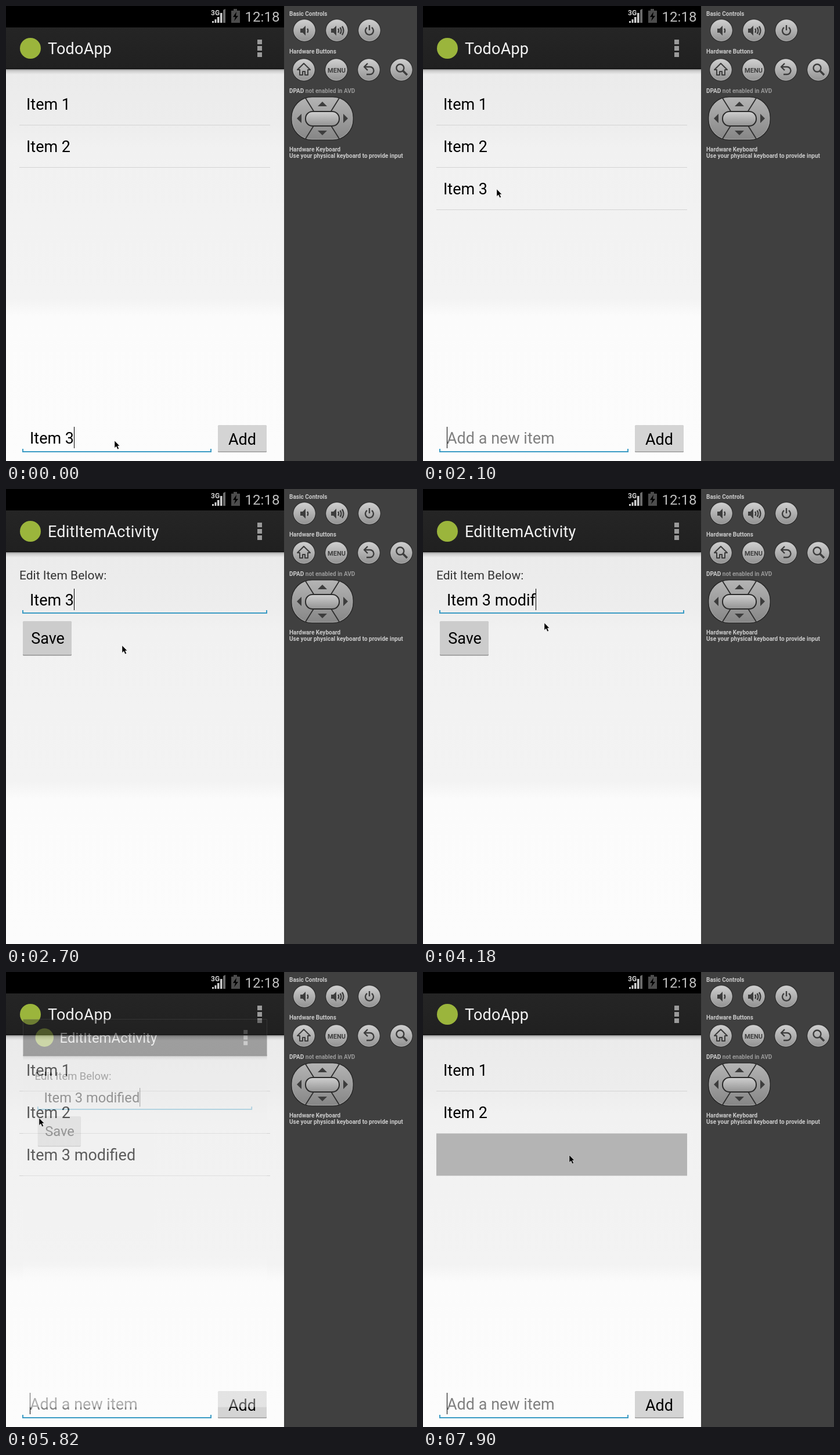
Animation of 708 by 785 pixels, one loop 8000 ms. Source, as an HTML page:

```html
<!DOCTYPE html>
<html lang="en">
<head>
<meta charset="utf-8">
<title>Todo list demo</title>
<style>
  html, body { margin: 0; width: 100%; height: 100%; overflow: hidden; background: #404040; }
  svg { display: block; width: 708px; height: 785px; }
  text { font: 27px Roboto, sans-serif; white-space: pre; }
  .title { fill: #f3f3f3; letter-spacing: .2px; }
  .mid { text-anchor: middle; }
  .line { fill: #d3d3d3; }
  .field { fill: none; stroke: #3a9bc4; stroke-width: 2; }
  .side text { font-size: 10px; font-weight: 700; fill: #cbcbcb; }
  .side .dim { fill: #999; }
  .glyph { fill: none; stroke: #3d3d3d; stroke-width: 2.4; stroke-linejoin: round; }
  .solid { fill: #3d3d3d; }
</style>
</head>
<body>
<svg viewBox="0 0 708 785">
  <defs>
    <linearGradient id="paper" gradientUnits="userSpaceOnUse" x1="0" y1="109" x2="0" y2="785">
      <stop offset="0" stop-color="#ebebeb"/>
      <stop offset=".14" stop-color="#ededed"/>
      <stop offset=".2" stop-color="#f1f1f1"/>
      <stop offset=".585" stop-color="#f3f3f3"/>
      <stop offset=".63" stop-color="#fbfbfb"/>
      <stop offset="1" stop-color="#fcfcfc"/>
    </linearGradient>
    <linearGradient id="shade" x2="0" y2="1">
      <stop offset="0" stop-color="#000" stop-opacity=".42"/>
      <stop offset=".3" stop-color="#000" stop-opacity=".14"/>
      <stop offset="1" stop-color="#000" stop-opacity="0"/>
    </linearGradient>
    <linearGradient id="bar" x2="0" y2="1">
      <stop offset="0" stop-color="#252525"/>
      <stop offset="1" stop-color="#202020"/>
    </linearGradient>
    <linearGradient id="metal" x2="0" y2="1">
      <stop offset="0" stop-color="#d0d0d0"/>
      <stop offset="1" stop-color="#929292"/>
    </linearGradient>
    <linearGradient id="pad" x2="0" y2="1">
      <stop offset="0" stop-color="#b4b4b4"/>
      <stop offset="1" stop-color="#868686"/>
    </linearGradient>
    <g id="screen">
      <rect y="37" width="479" height="763" fill="url(#paper)"/>
      <rect y="37" width="479" height="72" fill="url(#bar)"/>
      <rect y="107" width="479" height="2" fill="#161616"/>
      <rect y="109" width="479" height="9" fill="url(#shade)"/>
      <circle cx="42" cy="73" r="18" fill="#9bb53c"/>
      <path d="M433 58h8v8h-8zm0 11h8v8h-8zm0 11h8v8h-8z" fill="#9a9a9a"/>
    </g>
    <g id="knob">
      <circle r="20" fill="#303030"/>
      <circle r="18.3" fill="url(#metal)" stroke="#c6c6c6" stroke-width=".8"/>
    </g>
  </defs>

  <g id="todo">
    <use href="#screen"/>
    <text class="title" x="72" y="83">TodoApp</text>
    <text x="35" y="179">Item 1</text>
    <rect class="line" x="23" y="205" width="432" height="1"/>
    <text x="35" y="252">Item 2</text>
    <rect class="line" x="23" y="278" width="432" height="1"/>
    <g id="row">
      <rect class="line" x="23" y="351" width="432" height="1"/>
      <rect id="press" x="23" y="279" width="432" height="72"/>
      <text id="item" x="35" y="325"></text>
    </g>
    <path class="field" d="M29 764v5h324v-5"/>
    <text id="entry" x="41" y="755"></text>
    <rect id="entryCaret" y="726" width="1" height="37"/>
    <rect x="365" y="724" width="84" height="46" rx="1.5" fill="#9c9c9c"/>
    <rect x="365" y="723" width="84" height="45.5" rx="1.5" fill="#d4d4d4"/>
    <text class="mid" x="407" y="757">Add</text>
  </g>

  <g id="edit">
    <use href="#screen"/>
    <text class="title" x="72" y="83">EditItemActivity</text>
    <text x="23" y="156" style="font-size:21px" fill="#333">Edit Item Below:</text>
    <path class="field" d="M29 209v5h420v-5"/>
    <text id="draft" x="41" y="201"></text>
    <rect id="draftCaret" y="172" width="1" height="37"/>
    <rect x="29" y="229" width="84" height="58.5" rx="1.5" fill="#8f8f8f"/>
    <rect x="29" y="228" width="84" height="58" rx="1.5" fill="#ccc"/>
    <text class="mid" x="72" y="267">Save</text>
  </g>

  <rect width="479" height="37"/>
  <text x="353" y="16" fill="#d0d0d0" style="font-size:12px;font-weight:700">3G</text>
  <path d="M355 29v-3h3v3zm4.500 0v-6h3v6zm4.500 0v-10h3.500v10zm5 0v-17h3.500v17z" fill="#cfcfcf"/>
  <path d="M374 29v-22l4 -2v24z" fill="#6b6b6b"/>
  <path d="M388 8h4v-3h6v3h5v21h-15z" fill="#4c4c4c"/>
  <path d="M397 10l-6 9h4l-2 7 7-9h-4z"/>
  <text class="mid" x="441.500" y="27" fill="#bebebe" style="font-size:24px">12:18</text>

  <g class="side">
    <rect x="479" width="229" height="785" fill="#404040"/>
    <text x="488" y="17">Basic Controls</text>
    <text x="488" y="82">Hardware Buttons</text>
    <text x="488" y="150">DPAD <tspan class="dim">not enabled in AVD</tspan></text>
    <text x="488" y="251">Hardware Keyboard</text>
    <text x="488" y="262">Use your physical keyboard to provide input</text>

    <g id="knobs"></g>
    <path class="solid" d="M507 39h4l5-5v17l-5-5h-4zM560 39h4l5-5v17l-5-5h-4z"/>
    <path class="glyph" stroke-width="2" d="M519 39q2.500 3.500 0 7M572 39q2.500 3.500 0 7m3.500-9q4 5.500 0 11m3.500-13q5 7.500 0 15"/>
    <path class="glyph" d="M622 37a7 7 0 1 0 8 0M626 33v9"/>
    <path class="glyph" style="stroke-width:2" d="M502 110l11-11 11 11h-4v9h-5v-6h-4v6h-5v-9z"/>
    <text class="mid" x="569.500" y="115" style="font-size:11px;fill:#3d3d3d">MENU</text>
    <path class="glyph" d="M618 105h9a6 6 0 0 1 0 13h-6M623 99l-6 6 6 6"/>
    <circle class="glyph" cx="679" cy="107" r="6.500"/>
    <path class="glyph" style="stroke-width:3.500" d="M684 112l7 7"/>

    <rect x="491" y="156" width="108" height="76" rx="36" fill="#2a2a2a"/>
    <rect x="493" y="158" width="104" height="72" rx="34" fill="url(#pad)" stroke="#bdbdbd" stroke-width=".8"/>
    <path d="M516 159l15 24M574 159l-15 24M516 229l15-24M574 229l-15-24" stroke="#2e2e2e" stroke-width="1.800"/>
    <rect x="516" y="182" width="58" height="25" rx="12" fill="url(#metal)" stroke="#2b2b2b" stroke-width="2"/>
    <path class="solid" d="M537 173l8-8 8 8zM537 215h16l-8 8zM509 186v16l-8-8zM581 186v16l8-8z"/>
  </g>

  <path id="pointer" d="M0 0V12.500L3 9.800L5.200 14.800L7.500 13.800L5.300 9H8.800Z" stroke="#fff" stroke-width=".6" stroke-opacity=".8"/>
</svg>
<script>
const LOOP = 8000, STEP = 149.05;
const $ = id => document.getElementById(id);
const show = (el, on) => el.setAttribute('visibility', on ? 'inherit' : 'hidden');
const within = (n, a, b) => n >= a && n <= b;

// Pointer stops: step, x, y
const path = [
  [0, 187, 750], [4, 374, 748], [6, 377, 746], [7, 377, 742],
  [9, 355, 620], [11, 298, 470], [12, 240, 388], [13, 150, 326],
  [14, 127, 316], [16, 127, 316], [18, 200, 270], [19, 209, 231],
  [33, 209, 231], [34, 204, 231], [35, 204, 231], [36, 110, 240],
  [37, 36, 246], [38, 36, 246], [39, 57, 252], [41, 100, 265],
  [44, 225, 322], [46, 252, 316], [54, 252, 316]
];

// Steps in which each caret is blinked off
const entryOff = [[1, 3], [9, 11], [43, 45], [49, 51]];
const draftOff = [[22, 23], [30, 32], [36, 36]];

$('knobs').innerHTML = [[514, 42], [570, 42], [626, 42], [513, 110], [569, 110], [625, 110], [681, 110]]
  .map(([x, y]) => `<use href="#knob" x="${x}" y="${y}"/>`).join('');

function pointerAt(n) {
  const i = path.findIndex((p, k) => k && n <= p[0]);
  const [a, x, y] = path[i - 1], [b, u, v] = path[i];
  const k = (n - a) / (b - a);
  return [Math.round(x + (u - x) * k), Math.round(y + (v - y) * k)];
}

function setField(id, text, typed, off, n) {
  const el = $(id), caret = $(id + 'Caret');
  el.textContent = text;
  el.setAttribute('fill', typed ? '#000' : '#808080');
  const width = typed ? el.getComputedTextLength() : 0;
  caret.setAttribute('x', Math.round(41 + width));
  show(caret, !off.some(([a, b]) => within(n, a, b)));
}

function draw(n) {
  const added = n >= 6, saved = n >= 39, held = n >= 49;
  setField('entry', added ? 'Add a new item' : 'Item 3', !added, entryOff, n);
  show($('row'), added);
  $('item').textContent = n >= 53 ? '' : saved ? 'Item 3 modified' : 'Item 3';
  show($('press'), added && (held || within(n, 15, 16)));
  const grey = held ? Math.round(207 - 27 * Math.min(1, (n - 49) / 3.4)) : 207;
  $('press').setAttribute('fill', `rgb(${grey},${grey},${grey})`);

  const letters = Math.max(0, Math.min(8, n - 23));
  setField('draft', 'Item 3' + (n >= 20 ? ' ' : '') + 'modified'.slice(0, letters), true, draftOff, n);
  const moving = n === 16 || n === 39, s = moving ? .877 : 1;
  const edit = $('edit');
  show(edit, within(n, 16, 39));
  edit.setAttribute('opacity', moving ? .38 : 1);
  edit.setAttribute('transform', `translate(239.5 399) scale(${s}) translate(-239.5 -399)`);

  $('pointer').setAttribute('transform', `translate(${pointerAt(n)})`);
}

let last = -1;
function tick() {
  const n = Math.min(53, Math.floor(performance.now() % LOOP / STEP));
  if (n !== last) draw(last = n);
  requestAnimationFrame(tick);
}
tick();
</script>
</body>
</html>
```
